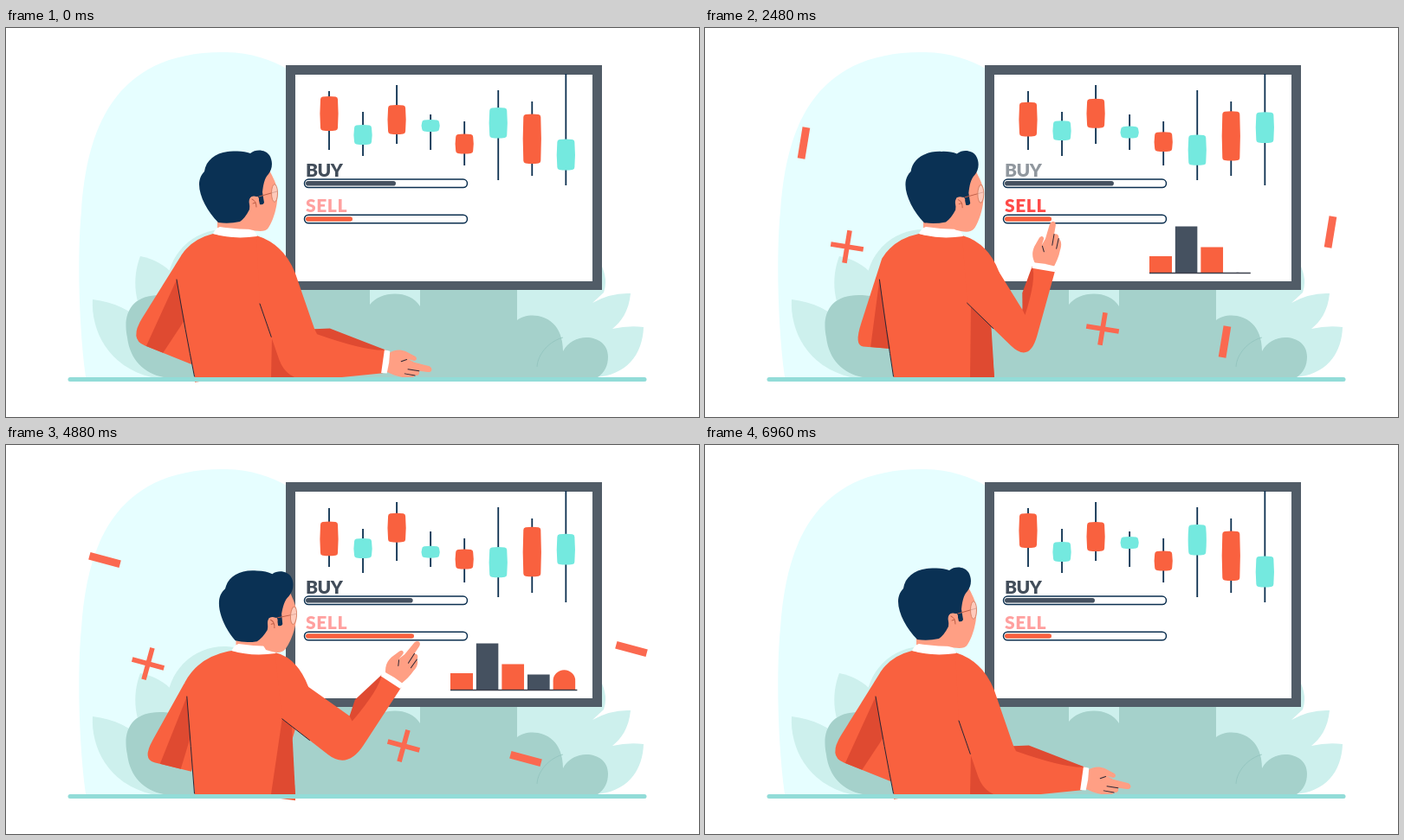
These frames come from a looping animation (800x450 px, 7 s). An HTML page:

```html
<!DOCTYPE html>
<html lang="en">
<head>
<meta charset="utf-8">
<title>Trading screen</title>
<style>
  html, body { margin: 0; width: 100%; height: 100%; overflow: hidden; background: #fff; }
  svg { display: block; width: 100vw; height: 100vh; }
  text { font: 900 21px Lato, "Open Sans", sans-serif; }
  .red { fill: #f9613f; }
  .shade { fill: #df4a31; }
  .dark { fill: #455160; }
  .mint { fill: #74e9df; }
  .light { fill: #cdf0ed; }
  .bush { fill: #a5d1cb; }
  .skin { fill: #ff9f84; }
  .hair { fill: #0a3154; }
  .white { fill: #fff; }
  .line { fill: none; stroke: #2b2634; stroke-width: 1; stroke-linecap: round; }
  .tan { stroke: #bd5f48; }
  .tube { fill: #fff; stroke: #0b2f4f; stroke-width: 1.5; }
</style>
</head>
<body>
<svg viewBox="0 0 800 450">
  <path fill="#e6feff" d="M92 404C84 345 82 262 87 212C93 120 123 28 250 28C282 28 304 36 326 48V404Z"/>
  <g class="light">
    <circle cx="252" cy="299" r="66"/>
    <path d="M100 314C98 350 118 392 168 404H205C175 352 150 320 100 314Z"/>
    <path d="M155 264C145 290 148 320 165 345L212 325C205 292 186 270 155 264Z"/>
    <path d="M410 295H670L688 276Q695 292 690 306L677 318Q698 306 721 307C719 328 710 340 700 348Q718 344 736 346C735 378 716 402 680 404H410Z"/>
  </g>
  <g class="bush">
    <path d="M182 404C160 400 143 384 140 358C133 325 150 302 196 311H300V295H420V320C432 304 466 302 478 322V295H590V338C604 327 643 330 643 374C655 350 695 354 695 380Q695 396 683 404Z"/>
  </g>
  <path fill="none" stroke="#8fc0ba" stroke-width=".7" d="M643 358C628 362 614 376 613 392"/>
  <path fill="#515c67" d="M323 43H688V303H323Z"/>
  <path class="white" d="M334 54H677V293H334Z"/>
  <g id="candles"></g>
  <text id="buy" x="346" y="171.5" fill="#424d5a" letter-spacing="-.5">BUY</text>
  <text id="sell" x="346" y="212.5" fill="#ff4a48" letter-spacing=".6">SELL</text>
  <rect class="tube" x="344.5" y="175" width="188" height="9.6" rx="4.8"/>
  <rect class="dark" id="buyBar" x="346" y="177" height="5.6" rx="2.8"/>
  <rect class="tube" x="344.5" y="216.2" width="188" height="9.6" rx="4.8"/>
  <rect class="red" id="sellBar" x="346" y="218.2" height="5.6" rx="2.8"/>
  <g id="chart"></g>
  <path id="chartBase" stroke="#3b3f4b" stroke-width="1.3"/>
  <g id="signs" fill="#fb6950"></g>
  <path class="red" id="leftArm"/>
  <path class="red" id="torso"/>
  <path class="shade" id="leftShade"/>
  <path class="shade" id="sideShade"/>
  <path class="line" id="backLine"/>
  <g id="hand">
    <path class="skin" d="M3 -10C9 -15 15 -17 23 -15L34 -11C38 -9 36 -5 32 -6L26 -7L34 -4L52 -2C57 0 56 5 51 5L41 5C43 9 40 11 37 11C35 15 29 16 24 15C16 15 10 13 3 11Z"/>
    <path class="line" d="M25 -6L19 -3M28 5L41 5M25 10.5L37 11"/>
  </g>
  <path class="red" id="rightArm"/>
  <path class="shade" id="flap"/>
  <path class="line" id="crease"/>
  <path class="white" id="cuff" d="M-2 -13.5L4.5 -13Q6 0 4.5 13L-2 13.5Z"/>
  <path class="skin" id="neck" d="M244 218H284V238H244Z"/>
  <path class="white" id="collar" d="M239 238Q242 231 247 230Q266 233 285 233Q289 237 290 241Q262 245 239 238Z"/>
  <g id="head">
    <path class="skin" d="M302 160C306 170 312 177 313 188C315 204 308 224 303 231C299 237 289 235 281 233L268 215L280 180Z"/>
    <path class="hair" d="M245 225C233 213 223 195 223 181C223 174 226 169 229 166C231 151 245 142 264 142.5Q275 142 282 145C289 139 300 141 304 147C309 155 307 164 303 169C298 174 297 182 296 190L298 202Q297 205 293 204L291 195L282 196L281 210Q276 220 270 224Q257 227 245 225Z"/>
    <path class="skin" d="M292 197C286 192 279 195 281 204C282 209 288 212 291 209Z"/>
    <path class="line tan" d="M284 198Q289 200 289 207M285 203L288 202M292 195L313 189"/>
    <ellipse cx="310" cy="191" rx="3.5" ry="10.3" fill="#fff" fill-opacity=".45" stroke="#d98468"/>
  </g>
  <path stroke="#92dcd8" stroke-width="5" stroke-linecap="round" d="M74 406.5H737"/>
</svg>
<script>
const LOOP = 7000, STEP = 40;
const $ = id => document.getElementById(id);
const set = (el, name, value) => el.setAttribute(name, value);
const draw = (id, d) => set($(id), 'd', d);
const place = (id, value) => set($(id), 'transform', value);
const clamp = v => Math.min(1, Math.max(0, v));
const mix = (a, b, k) => a.map((v, i) => v + (b[i] - v) * k);
const at = (...p) => p.map(v => v.toFixed(2)).join(' ');
const swing = turns => (1 - Math.cos(2 * Math.PI * turns)) / 2;
const ramp = (t, from, to) => {
  const k = clamp((t - from) / (to - from));
  return k * k * (3 - 2 * k);
};

function add(parent, tag, attrs) {
  const el = document.createElementNS('http://www.w3.org/2000/svg', tag);
  for (const k in attrs) set(el, k, attrs[k]);
  return parent.appendChild(el);
}

// Key poses: lean of the body, wrist place and angle, left elbow
const rest = { lean: 0, x: 437, y: 386, angle: 8, left: 142 };
const poses = [
  { t: 0, ...rest },
  { t: 1480, lean: 11.5, x: 418, y: 297, angle: -59, left: 165 },
  { t: 2480, lean: 8, x: 391, y: 278, angle: -80, left: 172 },
  { t: 3920, lean: 20.5, x: 432, y: 267, angle: -63, left: 168 },
  { t: 4880, lean: 21.5, x: 445, y: 273, angle: -57, left: 157 },
  { t: 5440, lean: 11.5, x: 453, y: 327, angle: -25, left: 149 },
  { t: 6960, ...rest }
];

// Monotone cubic through one field of the poses, at rest at both ends
function pose(key, t) {
  const last = poses.length - 1;
  if (t >= poses[last].t) return poses[last][key];
  const i = poses.findIndex((p, n) => n < last && t < poses[n + 1].t);
  const slope = j => (poses[j + 1][key] - poses[j][key]) / (poses[j + 1].t - poses[j].t);
  const tangent = j => {
    if (j === 0 || j === last) return 0;
    const a = slope(j - 1), b = slope(j);
    return a * b > 0 ? 2 * a * b / (a + b) : 0;
  };
  const w = poses[i + 1].t - poses[i].t, k = (t - poses[i].t) / w, eased = k * k * (3 - 2 * k);
  return poses[i][key] + (poses[i + 1][key] - poses[i][key]) * eased
    + w * k * (1 - k) * ((1 - k) * tangent(i) - k * tangent(i + 1));
}

// Body height, wick ends, resting top, travel, swings per loop
const candles = [
  [40, 73, 141, 79, 10.5, 2], [23, 97, 148, 112, -6, 1], [34, 66, 134, 89, -11.5, 2], [14, 100, 141, 106, 12, 2],
  [23, 108, 159, 122.5, -3, 1], [35.5, 72, 176, 92, 39, 1], [57.5, 85, 171, 99.5, -5.3, 2], [36, 53, 182, 128.5, -39, 1]
].map(([h, top, end, y, travel, swings], i) => {
  const x = 373 + 39.05 * i;
  add($('candles'), 'path', { d: `M${x} ${top}V${end}`, stroke: '#0b2f4f', 'stroke-width': 1.8 });
  const body = add($('candles'), 'path', {
    class: i % 2 ? 'mint' : 'red',
    d: `M-7.5 .6Q0 -.5 7.5 .6Q10 1 10 3.5Q11.2 ${h / 2} 10 ${h - 3.5}Q10 ${h - 1} 7.5 ${h - .6}`
      + `Q0 ${h + .5} -7.5 ${h - .6}Q-10 ${h - 1} -10 ${h - 3.5}Q-11.2 ${h / 2} -10 3.5Q-10 1 -7.5 .6Z`
  });
  return t => set(body, 'transform', `translate(${x} ${y + travel * swing(swings * t / LOOP)})`);
});

// Round-capped columns, cut off at their final height
const BASE = 283;
const columns = [19, 53.5, 29.5, 17.5, 39.7].map((h, i) => {
  const x = 513 + 29.6 * i, start = 125 + 280 * i;
  const clip = add($('chart'), 'clipPath', { id: 'cut' + i });
  add(clip, 'rect', { x, y: BASE - h, width: 26, height: h });
  const bar = add($('chart'), 'rect', {
    class: i % 2 ? 'dark' : 'red', x, width: 26, height: 100, rx: 13, 'clip-path': `url(#cut${i})`
  });
  return u => {
    set(bar, 'y', BASE - ramp(u, start, start + 300) * (h + 14));
    return u > start ? x + 28 : 0;
  };
});

const MINUS = 'M-18.3 -4.4H18.3V4.4H-18.3Z';
const PLUS = 'M-19 -2.8H19V2.8H-19ZM-2.8 -19H2.8V19H-2.8Z';
const signs = [[MINUS, 114, 133], [PLUS, 164, 253], [PLUS, 459, 348], [MINUS, 600, 363], [MINUS, 722, 236]].map(([d, x, y]) => {
  const el = add($('signs'), 'path', { d });
  return (angle, size) => set(el, 'transform', `translate(${x} ${y}) rotate(${angle}) scale(${size})`);
});

function drawScreen(t) {
  candles.forEach(move => move(t));
  set($('buyBar'), 'width', 104 + 30 * (ramp(t, 700, 3400) - ramp(t, 3500, LOOP)));
  set($('sellBar'), 'width', 54 + 71 * (ramp(t, 2450, 4250) - ramp(t, 5600, 6800)));
  const selling = t >= 1000 && t < 3000 || t >= 5000 && t < 6500;
  set($('buy'), 'opacity', selling ? .58 : 1);
  set($('sell'), 'opacity', selling ? 1 : .52);
  const half = t % (LOOP / 2);
  const right = Math.max(...columns.map(grow => grow(Math.min(half, 3460 - half))));
  draw('chartBase', right ? `M513 283.5H${right}` : '');
  const size = Math.min(clamp((t - 100) / 800), clamp((6860 - t) / 600));
  signs.forEach(turn => turn(t * .04, size));
}

function drawPerson(t) {
  const [lean, x, y, angle, left] = ['lean', 'x', 'y', 'angle', 'left'].map(k => pose(k, t));
  const from = (p, deg, r) => [p[0] + r * Math.cos(deg * Math.PI / 180), p[1] + r * Math.sin(deg * Math.PI / 180)];
  const turn = lean * lean * .009;
  place('head', `translate(${lean * 1.05} ${turn * .7}) rotate(${turn} 265 185)`);
  place('neck', `translate(${lean})`);
  place('collar', `translate(${lean})`);

  const wrist = [x, y], upper = from(wrist, angle - 90, 13.5), lower = from(wrist, angle + 90, 13.5);
  const inner = from(wrist, angle + 197, 86 + angle * .4);
  const elbow = [inner[0] - 28 - angle * .45, inner[1] + 62];
  const shoulder = [334 + lean * .7, 284 - lean * .2], crease = [293 + lean * 1.2, 319 - lean * .1];
  const collarL = [239 + lean, 238], collarR = [289 + lean, 240];
  const back = [203 + lean * .15, 262 + lean * .6], seam = [197 + lean * .55, 291];
  const leftElbow = [left, 360 + (left - 142) * .25], underArm = [214, 371 + Math.max(0, 166 - left) * .75];
  const waist = at(207 + lean * .3, 350), foot = [218, 404];

  draw('leftArm', `M${at(...back)}L${at(...mix(leftElbow, back, .25))}Q${at(...leftElbow)} ${at(...mix(leftElbow, underArm, .25))}`
    + `L${at(...underArm)}L230 330Z`);
  draw('torso', `M${at(...collarL)}Q${at(215 + lean * .35, 244)} ${at(...back)}L${at(...seam)}Q${waist} ${at(...foot)}`
    + `V${409.8 - lean * .2}L238 407H302L334 ${407 + lean * .2}V404L329 345L${at(...shoulder)}L${at(...collarR)}`
    + `Q${at(264 + lean, 244)} ${at(...collarL)}Z`);
  const slim = left - 141;
  draw('leftShade', `M${at(...seam)}L${at(...mix(leftElbow, underArm, .27 + slim * .006))}`
    + `L${at(...mix(leftElbow, underArm, clamp(.53 + slim * .016)))}L${at(...mix(seam, foot, .42))}Z`);
  draw('backLine', `M${at(...seam)}Q${waist} 217.5 403`);

  const reach = clamp((307 - crease[0]) / (elbow[0] - crease[0]));
  draw('sideShade', `M${at(...mix(crease, elbow, reach))}L306 404H334L330 ${elbow[1] - 50}Z`);
  draw('rightArm', `M${at(...collarR)}Q${at(shoulder[0] - 13, shoulder[1] - 34)} ${at(...shoulder)}L${at(...inner)}`
    + `L${at(...upper)}L${at(...lower)}L${at(...mix(elbow, lower, .3))}Q${at(...elbow)} ${at(...mix(elbow, crease, .3))}`
    + `L${at(...crease)}Z`);
  const ridge = mix(inner, upper, .25);
  draw('flap', `M${at(...inner)}L${at(ridge[0] - 3, ridge[1] - 7)}L${at(...upper)}`
    + `Q${at(...mix(mix(inner, upper, .65), lower, .3))} ${at(inner[0] + 3, inner[1] + 6)}Z`);
  draw('crease', `M${at(...crease)}L${at(...mix(crease, elbow, .42))}`);
  for (const id of ['hand', 'cuff']) place(id, `translate(${x} ${y}) rotate(${angle})`);
}

const begin = performance.now();
function frame() {
  const t = Math.floor((performance.now() - begin) % LOOP / STEP) * STEP;
  drawScreen(t);
  drawPerson(t);
  requestAnimationFrame(frame);
}
frame();
</script>
</body>
</html>
```
